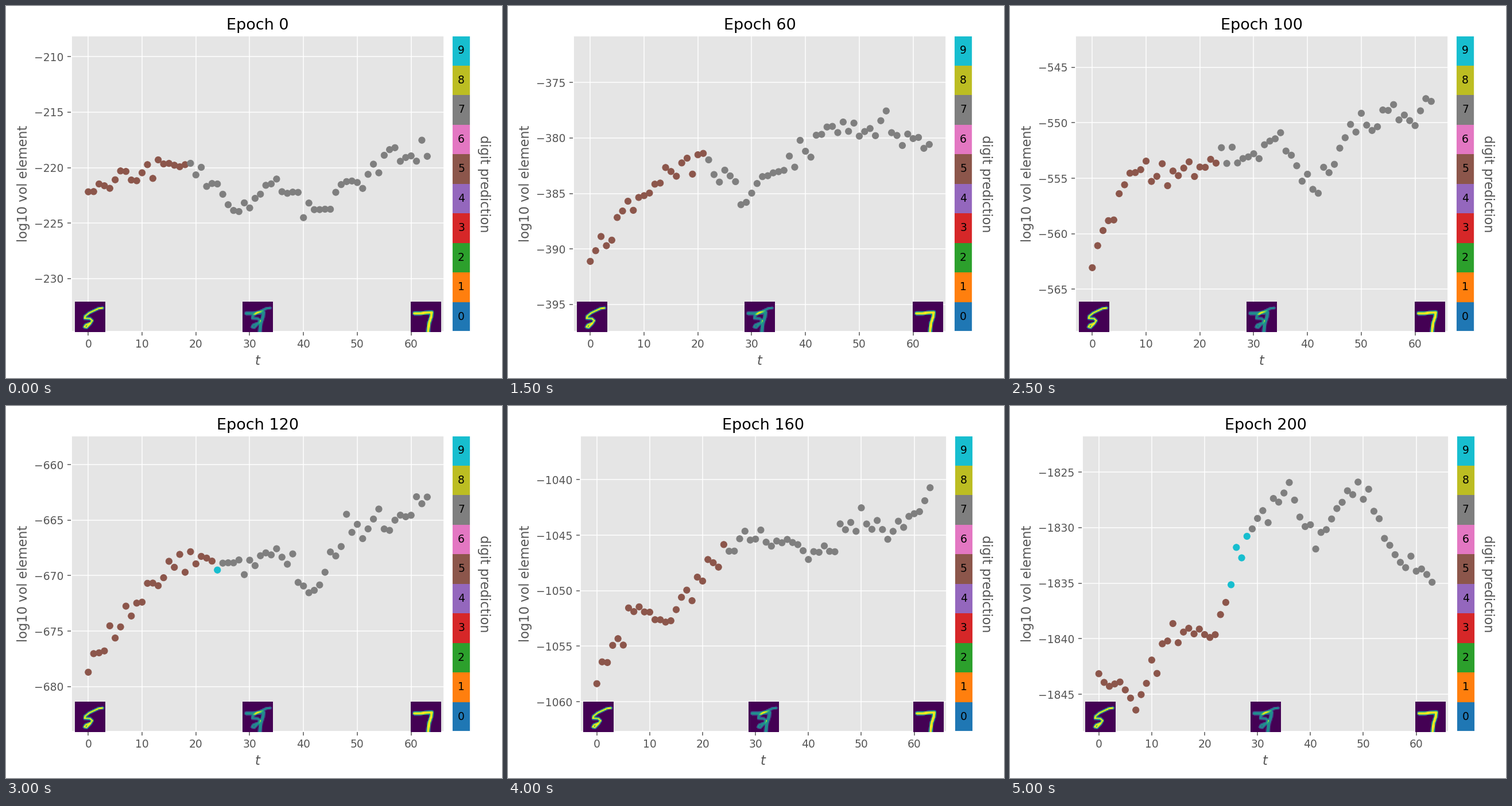
Animation, 864 px wide and 648 px high, one loop 5500 ms. Source, as a matplotlib script:

```python
import matplotlib.pyplot as plt
import numpy as np
from matplotlib.animation import FuncAnimation
from matplotlib.offsetbox import AnnotationBbox, OffsetImage
from matplotlib.ticker import MultipleLocator

W, H, DPI = 864, 648, 135
TOP, BOTTOM = 52.1, 567        # plot area, px from the top of the stage
SPAN = 26.62                   # height of the y axis in data units
STEP = 20                      # epochs between two pictures
T = np.arange(64)
KNOTS = np.linspace(0, 63, 10)

# epoch: lower y limit, first t read as 9, first t read as 7, trend above the limit
RUNS = {
    0: (-234.76, 19, 19, [12.5, 13.8, 15.9, 13.9, 11.1, 13.5, 10.1, 12.7, 16.1, 16.1]),
    20: (-279.76, 21, 21, None),
    40: (-333.94, 22, 22, [6.5, 9.9, 12.1, 15.3, 9.4, 14.0, 18.2, 19.3, 16.9, 17.7]),
    60: (-397.43, 22, 22, None),
    80: (-475.19, 23, 23, [7.5, 11.3, 15.1, 16.8, 14.4, 14.8, 16.6, 17.9, 19.3, 16.7]),
    100: (-568.80, 24, 24, [6.5, 13.8, 14.0, 15.7, 15.4, 17.5, 12.5, 18.3, 19.6, 20.0]),
    120: (-684.04, 24, 25, None),
    140: (-842.36, 25, 27, [5.0, 6.9, 14.5, 16.2, 13.8, 15.1, 12.2, 19.7, 18.4, 21.3]),
    160: (-1062.68, 25, 25, [5.2, 10.9, 9.6, 14.5, 17.1, 17.9, 15.4, 19.4, 17.6, 21.5]),
    180: (-1366.04, 25, 28, None),
    200: (-1848.36, 25, 29, [5.0, 2.9, 9.4, 8.3, 17.1, 22.5, 16.9, 22.3, 16.1, 13.8]),
}


def trend(epoch):
    """Key heights; where none are given, the mean of both neighbours."""
    heights = RUNS[epoch][3]
    if heights is None:
        heights = np.mean([trend(epoch - STEP), trend(epoch + STEP)], axis=0)
    return heights


def sample(epoch):
    """Volume element and predicted digit for every t."""
    low, first9, first7, _ = RUNS[epoch]
    noise = np.random.default_rng(epoch).normal(0, 0.65, T.size)
    values = low + np.interp(T, KNOTS, trend(epoch)) + noise
    digits = np.select([T < first9, T < first7], [5, 9], 7)
    return values, digits


def stroke(points, width):
    """28 x 28 picture of a pen stroke."""
    gy, gx = np.mgrid[:28, :28] + 0.5
    dist = np.full((28, 28), 99.0)
    for (x0, y0), (x1, y1) in zip(points, points[1:]):
        dx, dy = x1 - x0, y1 - y0
        k = np.clip(((gx - x0) * dx + (gy - y0) * dy) / (dx * dx + dy * dy), 0, 1)
        dist = np.minimum(dist, np.hypot(gx - x0 - k * dx, gy - y0 - k * dy))
    return np.clip(width / 2 + 0.5 - dist, 0, 1)


five = stroke([(25.5, 5.8), (22, 6.2), (16, 9), (13, 10.5), (9.3, 13.5), (9, 15.3),
               (14, 15.6), (16, 17.5), (14, 20.5), (10.8, 23.8), (8.7, 23.3),
               (9.8, 21.5), (13.5, 20)], 2)
seven = stroke([(3.5, 10.8), (9, 10.8), (14, 10.2), (19.4, 9.9), (18.8, 14),
                (16.8, 20), (15.9, 28)], 3)

plt.style.use("ggplot")
fig = plt.figure(figsize=(W / DPI, H / DPI), dpi=DPI, facecolor="white")
ax = fig.add_axes([0.1, 0.1, 0.8, 0.8])
ax.set(xlim=(-3.15, 66.15), xlabel="$t$", ylabel="log10 vol element")
ax.xaxis.set_major_locator(MultipleLocator(10))
ax.yaxis.set_major_locator(MultipleLocator(5))
dots = ax.scatter(T, T, s=36, linewidths=0.5)
title = ax.set_title("")

for x, picture in zip((0.05, 0.5, 0.95), (five, (five + seven) / 2, seven)):
    thumb = OffsetImage(picture, zoom=1, cmap="viridis")
    ax.add_artist(AnnotationBbox(thumb, (x, 0.05), xycoords="axes fraction",
                                 frameon=False, pad=0))

bar = fig.add_axes([0.9, 0.1, 0.03, 0.8])
bar.imshow(T[:10, None], cmap="tab10", vmin=0, vmax=9, origin="lower",
           aspect="auto", extent=(0, 1, -0.5, 9.5), interpolation="nearest")
bar.set(xticks=[], yticks=[])
for d in range(10):
    bar.text(0.5, d, str(d), ha="center", va="center", fontsize=10, color="black")
fig.text(1 - 20.25 / W, 1 - (TOP + BOTTOM) / 2 / H, "digit prediction", rotation=270,
         fontsize=12, color="#555555", ha="right", va="center")


def place(axes, left, right):
    axes.set_position([left / W, 1 - BOTTOM / H, (right - left) / W, (BOTTOM - TOP) / H])


def draw(i):
    epoch = i * STEP
    low = RUNS[epoch][0]
    # four-digit labels push the plot to the right
    left, right = (125.7, 764.3) if low < -1000 else (113.8, 763.3)
    bar_left = right + 0.1 * DPI
    place(ax, left, right)
    place(bar, bar_left, bar_left + 0.05 * (right - left))

    values, digits = sample(epoch)
    colors = plt.cm.tab10(digits)
    ax.set_ylim(low, low + SPAN)
    dots.set_offsets(np.column_stack([T, values]))
    dots.set_facecolor(colors)
    dots.set_edgecolor(colors)
    title.set_text(f"Epoch {epoch}")
    return [dots, title]


anim = FuncAnimation(fig, draw, frames=len(RUNS), interval=500, repeat=True,
                     repeat_delay=0, init_func=lambda: draw(0), blit=False)
plt.show()
```
